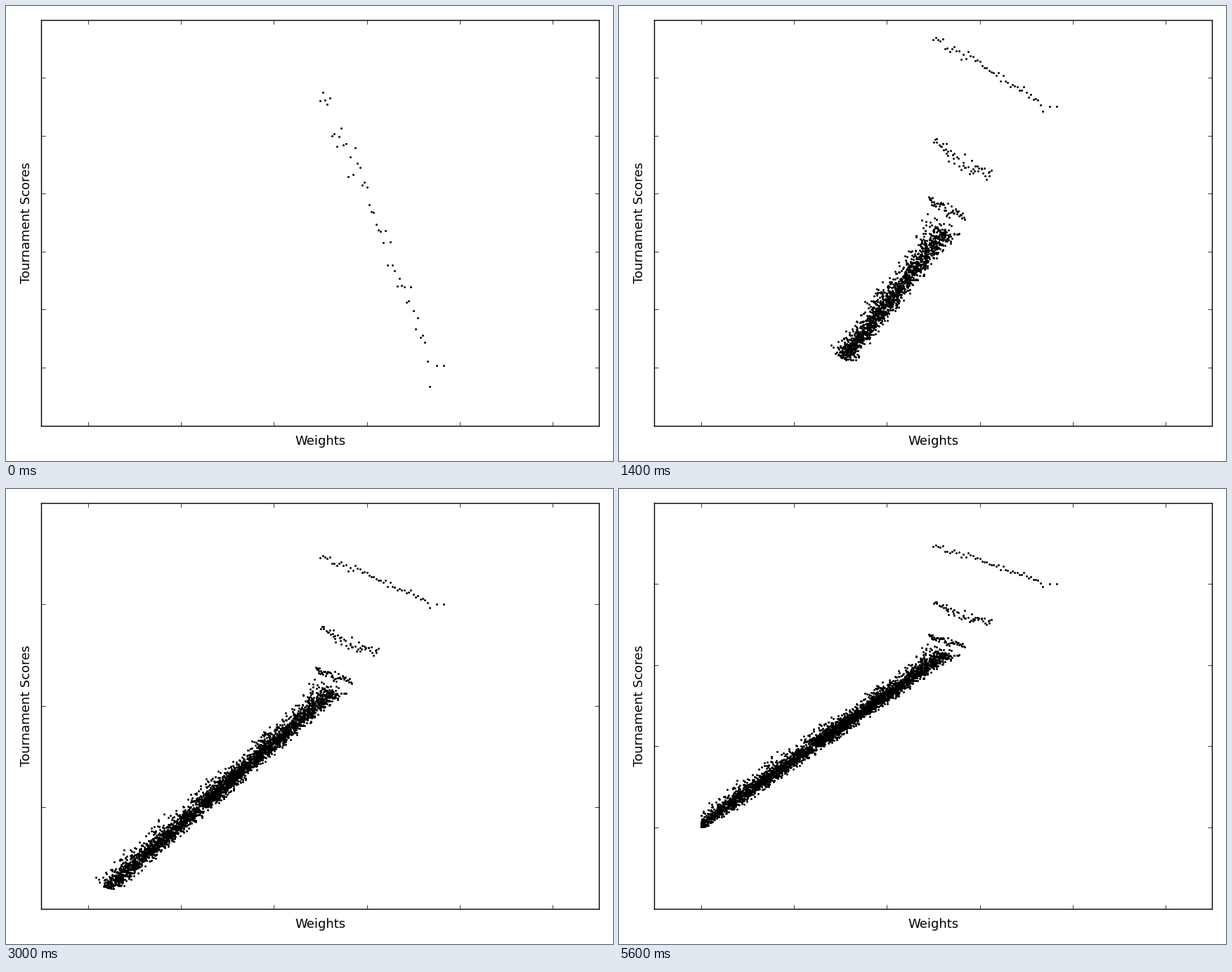
A matplotlib script that plays this animation: 864 px wide and 648 px high, repeating every 6 s.

```python
import math

import numpy as np
import matplotlib.pyplot as plt
from matplotlib.animation import FuncAnimation

W, H, DPI = 864, 648, 108
LEFT, RIGHT, TOP, BOTTOM = 50.4, 844.4, 19.6, 597.6
FRAMES, INTERVAL = 150, 40
PLAYERS = 50

rng = np.random.default_rng(12)

# Lowest score of a generation at a few key points
FLOOR_GEN = [3, 17, 27, 32, 47, 48, 64, 75, 80, 82]
FLOOR = [1051, 842, 726, 657, 500, 474, 264, 98, 14, 3]


def rescale(values, low, high):
    return np.interp(values, [values.min(), values.max()], [low, high])


def first_generation():
    d = np.append(np.arange(48), [50, 53]) / 2
    trend = np.maximum(1724 - 7.5 * d - 0.12 * d**2, 1480)
    scores = trend + rng.normal(0, 11, PLAYERS) * (d < 24)
    return np.column_stack([50 + d, rescale(scores, 1483.6, 1737.5)])


def second_generation():
    d = np.linspace(0, 12.5, PLAYERS) + rng.normal(0, 0.2, PLAYERS)
    scores = 125 * np.exp(-d / 4.5) + rng.normal(0, 13, PLAYERS)
    return np.column_stack([50 + np.abs(d), rescale(scores, 1248, 1390)])


def third_generation():
    d = 7.6 * np.linspace(0, 1, PLAYERS) ** 1.2
    scores = -9 * d + rng.normal(0, 12, PLAYERS)
    return np.column_stack([49.1 + d, rescale(scores, 1111, 1189)])


def later_generation(gen):
    """Low weights score best; the curve flattens out on the heavy side."""
    floor = np.interp(gen, FLOOR_GEN, FLOOR)
    spread = np.interp(gen, [3, 8, 75, 81, 97], [1.4, 1, 1, 0.32, 0.12])
    dev = np.clip(0.85 * rng.standard_t(5, PLAYERS), -3, 2.5)
    gain = 9 * np.log1p(np.exp(-1.4 * dev)) + rng.exponential(10, PLAYERS)
    mean = floor / 20 - 0.4 * spread
    weights = np.abs(mean + spread * dev)
    return np.column_stack([weights, floor + spread * (gain - gain.min())])


def score_axis(low, high, bins=9):
    """Round limits outward to whole tick steps, after a 5 % margin."""
    margin = 0.05 * (high - low)
    low, high = low - margin, high + margin
    raw = (high - low) / bins
    scale = 10 ** math.floor(math.log10(raw))
    for step in (scale * k for k in (1, 2, 5, 10, 20)):
        start = step * math.floor(low / step)
        if step >= raw and start + bins * step >= high:
            break
    return start, step * math.ceil(high / step), step


generations = [first_generation(), second_generation(), third_generation()]
generations += [later_generation(g) for g in range(3, FRAMES)]
points = np.vstack(generations)

plt.rcParams["font.family"] = "DejaVu Sans"
fig = plt.figure(figsize=(W / DPI, H / DPI), dpi=DPI, facecolor="white")
ax = fig.add_axes([LEFT / W, 1 - BOTTOM / H, (RIGHT - LEFT) / W, (BOTTOM - TOP) / H])
ax.set_xlim(-10, 110)
ax.set_xticks(range(0, 101, 20))
ax.tick_params(direction="in", length=4, width=0.5, top=True, right=True,
               labelbottom=False, labelleft=False)
for spine in ax.spines.values():
    spine.set_linewidth(0.95)


def label(x, y, text, angle=0):
    fig.text(x / W, 1 - y / H, text, fontsize=12, rotation=angle,
             rotation_mode="anchor", ha="center", va="baseline")


label((LEFT + RIGHT) / 2, 625, "Weights")
label(33.7, (TOP + BOTTOM) / 2, "Tournament Scores", 90)

dots = ax.scatter([], [], s=1, c="black", linewidths=1)


def update(frame):
    shown = points[:PLAYERS * (frame + 1)]
    low, high, step = score_axis(shown[:, 1].min(), shown[:, 1].max())
    ax.set_yticks(np.arange(low, high + step / 2, step))
    ax.set_ylim(low, high)
    dots.set_offsets(shown)
    return dots,


anim = FuncAnimation(fig, update, frames=FRAMES, interval=INTERVAL,
                     repeat=True, repeat_delay=0, blit=False)
plt.show()
```
